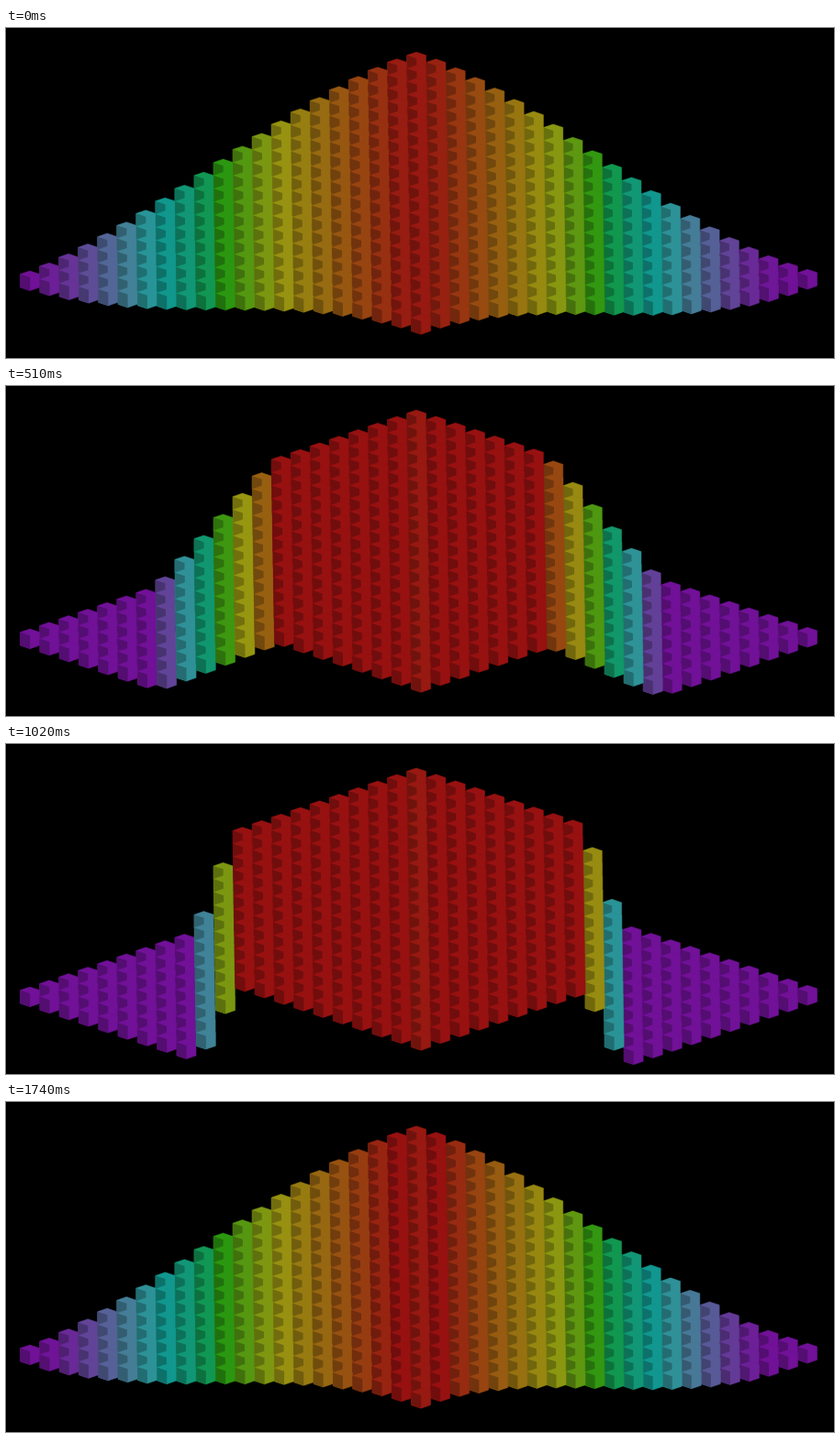
Write an HTML page with a canvas that moves like this. It is 902 by 360 pixels and loops after 1.77 s.

```html
<!DOCTYPE html>
<html lang="en">
<head>
<meta charset="utf-8">
<title>Cube wave</title>
<style>
  html, body { margin: 0; width: 100%; height: 100%; overflow: hidden; background: #000; }
  canvas { display: block; }
</style>
</head>
<body>
<canvas id="stage" width="902" height="360"></canvas>
<script>
const ctx = document.getElementById('stage').getContext('2d');
const LOOP = 1770, STEP = 30, SIZE = 21, DEPTH = 95, CUBE_H = 14.5;
const origin = { x: 447, y: 26 };
const right = { x: 21.3, y: 7.115 };   // grid step towards the right corner
const left = { x: -21.05, y: 7.2 };    // grid step towards the left corner

const clamp = (v, lo, hi) => Math.max(lo, Math.min(hi, v));
const ease = (v, from, to, power = 1) => clamp((v - from) / (to - from), 0, 1) ** power;

// Rainbow from red (v = 0, crest) to violet (v = 1, trough)
function colourAt(v) {
  const r = 1 - ease(v, .28, .52) + .71 * ease(v, .73, 1, .6);
  const g = ease(v, 0, .28, .6) - ease(v, .73, 1, 1.6);
  const b = ease(v, .5, .73, .45);
  return [r, g, b].map(x => 17 + 134 * x);
}

const shade = (rgb, f) => `rgb(${rgb.map(x => Math.round(x * f)).join(',')})`;

// Gain turns the cosine into a near-square wave and back
function gainAt(t) {
  const d = Math.min(Math.abs(t - 893), 885);
  return 1 / (.05 + .00106 * d - .043 * Math.sin(2 * Math.PI * d / 885));
}

// The wave is a little longer on the left; the middle column stays just short of the crest
function heightAt(c, gain) {
  const turn = c > 0 ? (c + .5) / 20 : (.4 - c) / 21.5;
  return clamp(gain * Math.cos(Math.PI * turn), -1, c ? 1 : .995);
}

function polygon(x, y, points) {
  ctx.beginPath();
  for (const [px, py] of points) ctx.lineTo(x + px, y + py);
  ctx.closePath();
  ctx.fill();
}

const rx = right.x / 2, ry = right.y / 2, lx = left.x / 2, ly = left.y / 2;
const fx = rx + lx, fy = ry + ly;
const outline = [[0, 0], [rx, ry], [rx, ry + CUBE_H], [fx, fy + CUBE_H], [lx, ly + CUBE_H], [lx, ly]];
const leftFace = [[lx, ly], [fx, fy], [fx, fy + CUBE_H], [lx, ly + CUBE_H]];

function drawCube(x, y, look) {
  ctx.fillStyle = ctx.strokeStyle = look.main;
  polygon(x, y, outline);
  ctx.stroke();
  ctx.fillStyle = look.dark;
  polygon(x, y, leftFace);
}

function draw(t) {
  const gain = gainAt(t);
  const columns = [];
  for (let c = 1 - SIZE; c < SIZE; c++) {
    const v = (1 - heightAt(c, gain)) / 2;
    const rgb = colourAt(v);
    columns.push({ drop: v * DEPTH, main: shade(rgb, 1), dark: shade(rgb, .75) });
  }
  ctx.fillStyle = '#000';
  ctx.fillRect(0, 0, 902, 360);
  ctx.lineWidth = .5;
  // Rows run from the back corner to the front
  for (let row = 0; row < 2 * SIZE - 1; row++) {
    for (let i = Math.max(0, row - SIZE + 1); i <= Math.min(row, SIZE - 1); i++) {
      const j = row - i;
      const look = columns[i - j + SIZE - 1];
      drawCube(origin.x + i * right.x + j * left.x,
               origin.y + i * right.y + j * left.y + look.drop, look);
    }
  }
}

const start = performance.now();
function tick() {
  const t = (performance.now() - start) % LOOP;
  draw(Math.floor(t / STEP) * STEP);
  requestAnimationFrame(tick);
}
tick();
</script>
</body>
</html>
```
